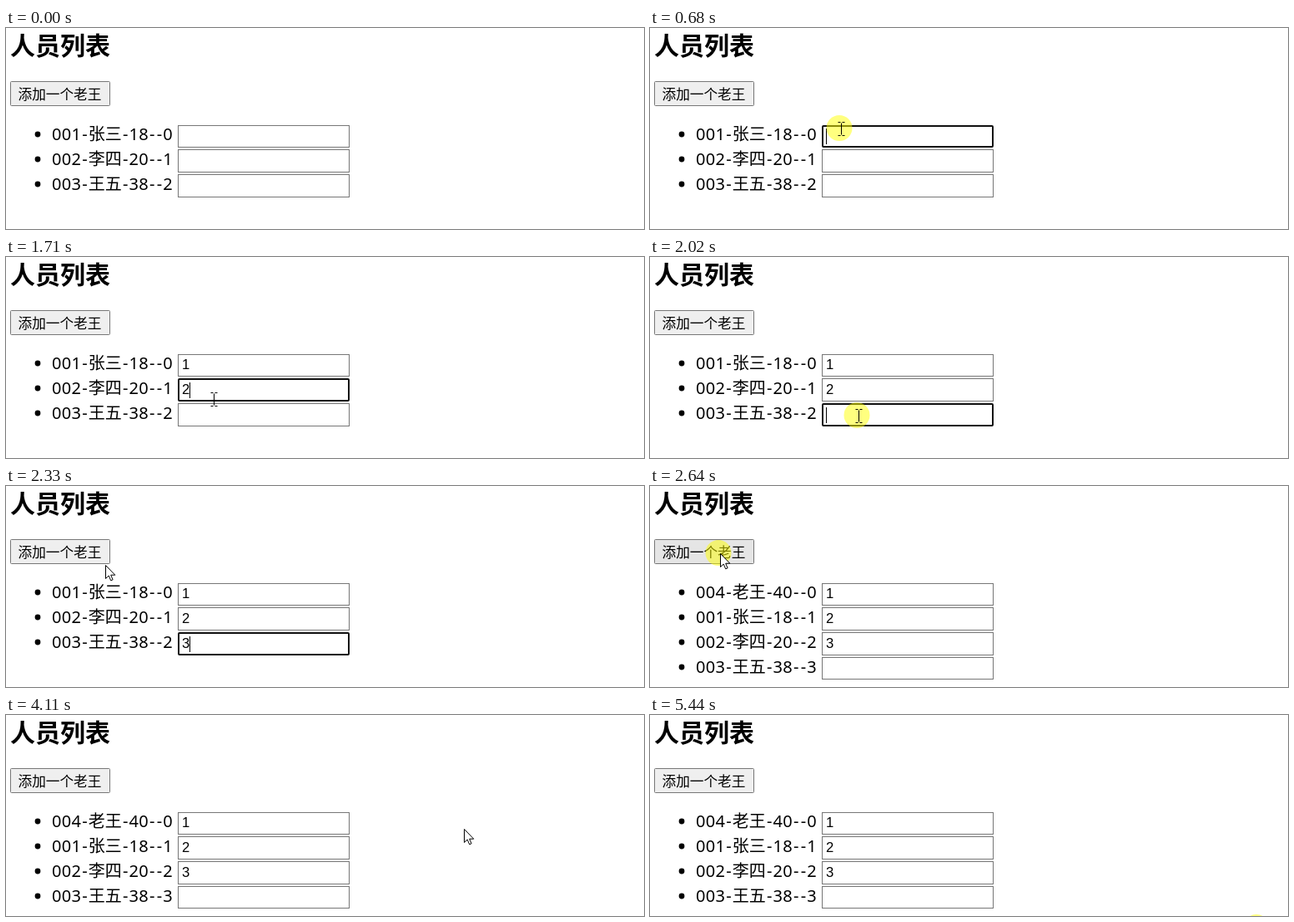
An HTML page for the animation above (5.55 s loop, 765 by 242 pixels).

```html
<!DOCTYPE html>
<html lang="zh">
<head>
<meta charset="utf-8">
<style>
  html, body { margin: 0; width: 100%; height: 100%; overflow: hidden; background: #fff; }
  svg { display: block; }
  text { font-family: "Noto Sans", "Noto Sans CJK SC", sans-serif; }
  .cjk { font-family: "Noto Sans CJK SC", "Noto Sans CJK", sans-serif; }
  .value { font: 16.67px "Liberation Sans", Arial, sans-serif; }
</style>
</head>
<body>
<svg id="stage" width="765" height="242" viewBox="0 0 765 242"></svg>
<script>
const LOOP = 5550, STEP = 78, ENTER = 70;
const stage = document.getElementById('stage');
const people = ['001-张三-18', '002-李四-20', '003-王五-38'];

// Pointer moves: start, end, and the place reached
const entry = [374, 166];
const moves = [
  [70, 220, 184, 121],
  [600, 680, 229, 121],
  [1000, 1380, 249, 157],
  [1620, 1795, 250, 191],
  [2170, 2330, 119, 95],
  [2330, 2480, 84, 81],
  [2700, 3290, 453, 102],
  [3290, 3410, 507, 121],
  [3520, 3640, 540, 131],
  [4032, 4620, 729, 256]
];

// Clicks: beside the list, on each input, on the button, off the page
const clicks = [390, 680, 1460, 1940, 2560, 5440];
const HOLD = 120, TYPE = 220;
const addTime = clicks[4] + STEP;

const smooth = k => k * k * (3 - 2 * k);

function pointerAt(t) {
  let [x, y] = entry;
  for (const [start, end, toX, toY] of moves) {
    if (t < start) break;
    const stepped = Math.floor((t - start) / STEP) * STEP;
    const k = t >= end ? 1 : smooth(stepped / (end - start));
    x += (toX - x) * k;
    y += (toY - y) * k;
  }
  return [Math.round(x), Math.round(y)];
}

function label(str, y) {
  let x = 55;
  const xs = [...str].map(c => {
    const at = c === '-' ? x + 1.1 : x;
    x += c === '-' ? 8.7 : /\d/.test(c) ? 11.7 : 20;
    return at.toFixed(1);
  });
  return `<text x="${xs.join(' ')}" y="${y}" font-size="20">${str}</text>`;
}

function row(str, i, t) {
  const base = 135 + 30 * i;
  const top = Math.round(116.6 + 29.8 * i), h = Math.round(144 + 29.8 * i) - top;
  const click = i < 3 ? clicks[i + 1] : LOOP;
  const focus = t >= click && t < clicks[i + 2];
  const filled = t >= click + TYPE;
  const w = focus ? 2 : 1;
  return `<circle cx="38" cy="${base - 7}" r="3.4"/>` + label(`${str}--${i}`, base) +
    `<rect x="${206 + w / 2}" y="${top + w / 2}" width="${206 - w}" height="${h - w}" rx="${w - 1}"
      fill="#fff" stroke="${focus ? '#101010' : '#767676'}" stroke-width="${w}"/>` +
    (filled ? `<text class="value" x="211" y="${base}">${i + 1}</text>` : '') +
    (focus ? `<rect x="${filled ? 220 : 211}" y="${base - 14}" width="1" height="19"/>` : '');
}

function pointer(t, x, y) {
  const beam = y > 112 && y < 206 && x > 130 && x < 412;
  const pressed = clicks.some(c => t >= c && t < c + HOLD);
  return (pressed ? `<circle cx="${x - 2}" cy="${y - .5}" r="15.5" fill="#ff0" opacity=".5"/>` : '') +
    `<path transform="translate(${x + .5} ${y + .5})" stroke="#000" ` + (beam
      ? 'fill="none" d="M-4-8h3M1-8h3M0-7v14M-4 8h3M1 8h3"/>'
      : 'fill="#fff" d="M0 0V16L3.7 12.5 6.2 18.3 8.6 17.3 6.2 11.7H11.3Z"/>');
}

function draw(t) {
  const [x, y] = pointerAt(t);
  const hover = x > 5 && x < 125 && y > 64 && y < 94;
  const rows = t >= addTime ? ['004-老王-40', ...people] : people;
  return '<text class="cjk" x="5" y="32" font-size="30" font-weight="700">人员列表</text>' +
    `<rect x="5.5" y="64.5" width="119" height="29" rx="1" fill="${hover ? '#e5e5e5' : '#efefef'}" stroke="#767676"/>` +
    '<text class="cjk" x="14.5" y="86" font-size="16.67">添加一个老王</text>' +
    rows.map((r, i) => row(r, i, t)).join('') +
    (t >= ENTER ? pointer(t, x, y) : '');
}

const t0 = performance.now();
let shown;
function frame() {
  const picture = draw((performance.now() - t0) % LOOP);
  if (picture !== shown) stage.innerHTML = shown = picture;
  requestAnimationFrame(frame);
}
frame();
</script>
</body>
</html>
```
